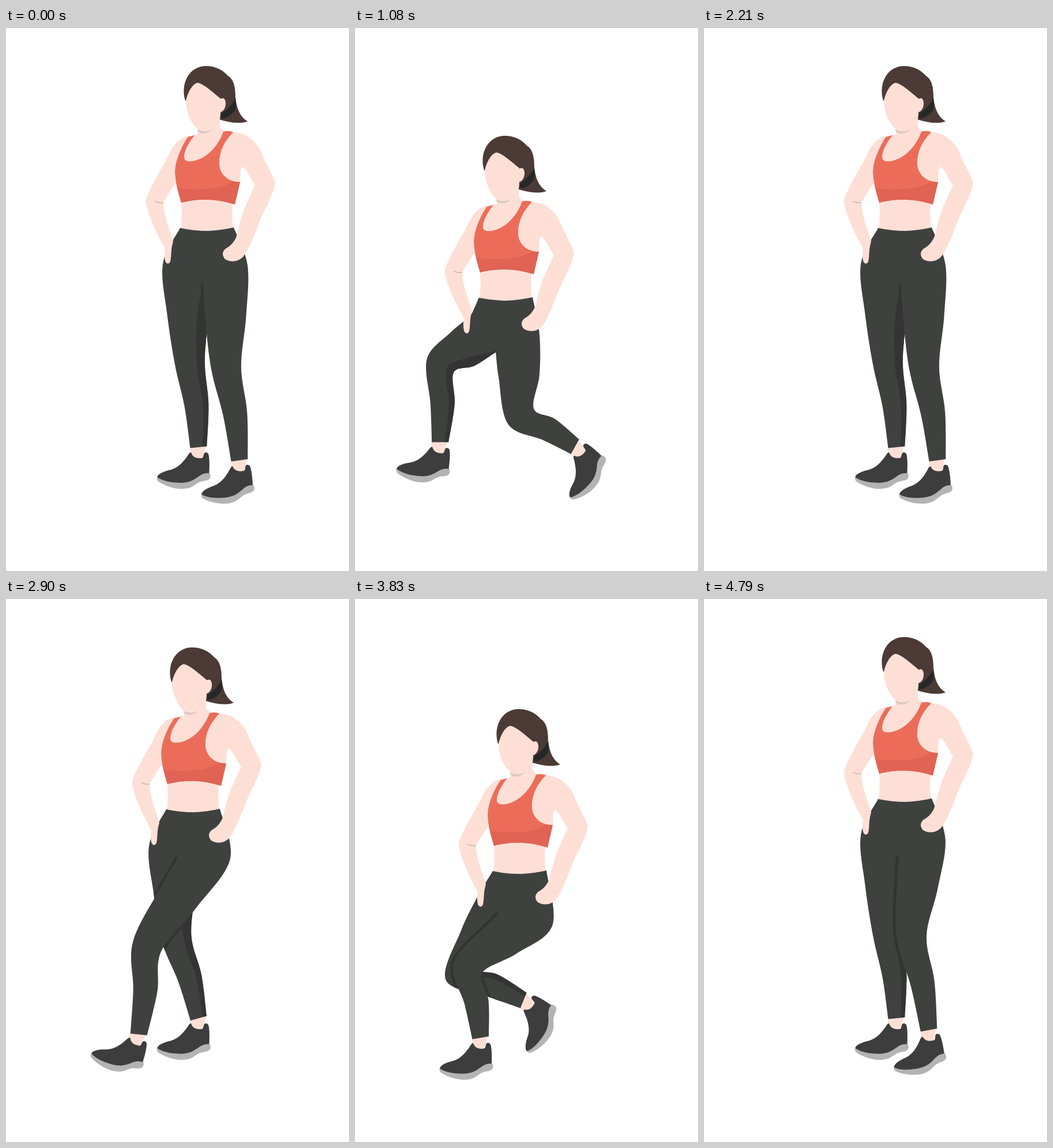
Animation of 595 by 942 pixels, one loop 4910 ms. Source, as an HTML page:

```html
<!DOCTYPE html>
<html lang="en">
<head>
<meta charset="utf-8">
<title>Alternating lunges</title>
<style>
  html, body { margin: 0; width: 100%; height: 100%; overflow: hidden; background: #fff; }
  svg { display: block; width: 100%; height: 100%; }
  .skin { fill: #fedfd6; }
  .pants { fill: #3f413f; }
  .shade { fill: #333433; }
  .hair { fill: #4b3a35; }
  .crease { fill: none; stroke: #d5bdb7; stroke-width: 2; stroke-linecap: round; }
  .cast { fill: none; stroke: #333433; stroke-width: 10; }
</style>
</head>
<body>
<svg viewBox="0 0 595 942">
  <defs>
    <clipPath id="farClip"><path id="farMask"/></clipPath>
    <g id="foot">
      <path class="skin" d="M-13-15L-12 2Q-7 10 2 10Q10 10 11 4L15-15Z"/>
      <path fill="#b3b3b3" d="M-64 49C-65 53-63 55-60 57C-46 64-25 68-10 63C0 60 4 53 10 50C17 46 27 47 28 39Q28 34 25 32Z"/>
      <path fill="#3d3d3d" d="M-64 49C-63 43-54 38-42 34C-29 29-21 17-15 6C-13 1-10-1-9 2C-6 9 3 10 10 8C13 6 11 0 14-2C17-3 20-2 21 2Q24 12 25 33C18 33 14 35 9 39C-1 48-10 55-30 55C-45 56-58 53-64 49Z"/>
    </g>
  </defs>

  <g class="body">
    <path class="skin" d="M333 165V184L315 189L304 215L310 303H304Q306 326 303 348L350 354L394 348Q391 326 393 305L405 267L396 182Q378 181 371 172V150Z"/>
    <path fill="#dcc8c2" d="M331 176Q347 183 360 173Q352 184 340 183Q333 182 331 176Z"/>
    <path class="hair" d="M311 126C302 96 318 66 347 66C363 66 377 73 385 83C395 89 398 102 398 120C400 140 406 154 419 162C405 167 388 164 371 159L370 130Z"/>
    <path fill="#252826" d="M398 122Q400 135 397 143Q388 154 377 157L372 155Q374 146 381 143Q392 134 398 122Z"/>
    <path class="skin" d="M312 126C316 109 324 97 332 95C340 95 356 109 373 123C378 119 382 126 381 133C380 141 376 145 372 146C372 158 370 164 362 172C351 182 338 181 330 173C319 163 312 142 312 126Z"/>
    <path fill="#eb6d59" d="M315 189L327 186C318 198 309 212 309 224C309 231 316 232 324 231C349 227 369 203 377 180Q386 177 395 181C378 197 370 215 370 235C371 255 386 267 406 267L397 306Q350 291 304 303Q293 270 293 248C294 229 304 204 315 189Z"/>
    <path fill="#e06354" d="M298 278C333 281 371 282 394 266L406 267L397 306Q350 291 304 303Z"/>
  </g>

  <use href="#foot" id="farFoot"/>
  <path id="farLeg" class="pants"/>
  <g clip-path="url(#farClip)">
    <path id="farShade" class="shade"/>
    <path id="castShade" class="cast"/>
  </g>
  <use href="#foot" id="nearFoot"/>
  <path id="nearLeg" class="pants"/>

  <g class="body">
    <path class="pants" d="M302 347Q326 352 350 352Q373 351 395 346L400 390L380 440L334 445L284 390Q292 368 302 347Z"/>
    <path class="skin" d="M317 187C303 190 293 199 286 213C275 237 260 258 247 287Q242 298 243 304C248 329 262 358 276 383Q274 395 276 404C278 410 283 410 285 405C287 397 286 388 288 378L290 370C284 350 273 324 273 303Q282 287 295 268Q290 245 298 224Q306 202 317 187Z"/>
    <path class="crease" d="M259 301Q266 304 272 303"/>
    <path class="skin" d="M394 181C413 181 430 192 441 211C449 234 463 254 467 269C464 290 446 319 440 336C431 358 424 379 412 396C404 406 389 407 380 401C373 393 376 385 384 381C391 377 397 369 400 361C405 339 411 318 418 303L432 273C425 264 421 251 413 243Q409 238 407 247L406 267C386 267 371 255 370 235C370 215 378 197 394 181Z"/>
  </g>
</svg>

<script>
const LOOP = 4910;
const el = id => document.getElementById(id);
const bodyParts = document.querySelectorAll('.body');

// torso: [dx, dy, near hip shift]; legs: [knee x, knee y, ankle x, ankle y, foot degrees]
const stand = { torso: [0, 0, 0], far: [319, 582, 331, 737, 6], near: [382, 590, 403, 760, 0] };
const farLift = { torso: [-38, 31, 0], far: [164, 575, 141, 705, 13.6], near: [336, 605, 403, 760, 0] };
const farReach = { torso: [-30, 23, 0], far: [162, 577, 136, 722, 11], near: [342, 603, 403, 760, 0] };
const farLunge = { torso: [-87, 121, -12], far: [148, 586, 144, 728, 10.5], near: [288, 674, 387, 735, -42.6] };
const farReturn = { torso: [-17, 3, 0], far: [185, 578, 171, 709, 12.4], near: [358, 598, 403, 760, 0] };
const nearLift = { torso: [-24, 18, 0], far: [296, 590, 331, 737, 6], near: [245, 602, 225, 764, 20] };
const nearReach = { torso: [-38, 23, 0], far: [296, 590, 331, 737, 6], near: [238, 606, 212, 771, 5] };
const nearLunge = { torso: [-63, 125, 0], far: [182, 652, 299, 704, -52], near: [196, 640, 215, 771, 5] };
const nearDeep = { ...nearLunge, torso: [-66, 131, 0] };
const settle = { ...stand, near: [360, 586, 389, 758, -5] };

// Each phase moves on from the pose before it: [start ms, ms per step, steps, pose]
const phases = [
  [0, 80, 1, stand],
  [200, 80, 5, farReach],
  [720, 120, 4, farLunge],
  [1410, 120, 3, farLift],
  [1770, 120, 2, farReturn],
  [1970, 80, 4, stand],
  [2540, 120, 4, nearLift],
  [3020, 120, 1, nearReach],
  [3140, 120, 4, nearDeep],
  [3830, 120, 1, nearLunge],
  [3950, 120, 4, nearLift],
  [4430, 120, 4, settle]
];

const ease = p => p * p * (3 - 2 * p);
const lerp = (a, b, t) => a.map((v, i) => v + (b[i] - v) * t);

function poseAt(time) {
  const index = phases.findLastIndex(([start]) => start <= time);
  const [start, interval, count, to] = phases[index];
  const from = index ? phases[index - 1][3] : to;
  const step = Math.min(count, Math.floor((time - start) / interval) + 1);
  const mix = ease(step / count);
  return {
    torso: lerp(from.torso, to.torso, mix),
    far: lerp(from.far, to.far, mix),
    near: lerp(from.near, to.near, mix)
  };
}

function unit([x, y]) {
  const length = Math.hypot(x, y);
  return [x / length, y / length];
}

// Smooth open curve through the points, starting with the given command.
function curve(pts, command = 'L') {
  const at = i => pts[Math.max(0, Math.min(pts.length - 1, i))];
  const handle = (p, a, b) => [0, 1].map(k => p[k] + (b[k] - a[k]) / 6);
  let d = command + pts[0];
  for (let i = 0; i < pts.length - 1; i++) {
    d += `C${handle(at(i), at(i - 1), at(i + 1))} ${handle(at(i + 1), at(i + 2), at(i))} ${at(i + 1)}`;
  }
  return d;
}

// Tapers a trouser leg around the hip-knee-hem axis.
function legEdges(hip, [kneeX, kneeY, ankleX, ankleY, degrees]) {
  const angle = degrees * Math.PI / 180;
  const knee = [kneeX, kneeY];
  const hem = [
    ankleX + 2 * Math.cos(angle) + 10 * Math.sin(angle),
    ankleY + 2 * Math.sin(angle) - 10 * Math.cos(angle)
  ];
  const thigh = unit([knee[0] - hip[0], knee[1] - hip[1]]);
  const shin = unit([hem[0] - knee[0], hem[1] - knee[1]]);
  const bend = unit([thigh[0] + shin[0], thigh[1] + shin[1]]);
  // centre, direction, half width, shade width, backward bulge
  const sections = [
    [hip, thigh, 39, 0, 0],
    [lerp(hip, knee, .5), thigh, 35.5, 18, 0],
    [knee, bend, 26, 14, 0],
    [lerp(knee, hem, .5), shin, 21, 10, 4],
    [hem, shin, 14.5, 7, 0]
  ];
  const edge = offset => sections.map(([[x, y], [dx, dy], width, shade, bulge]) => {
    const out = offset(width, shade) + bulge;
    return [x + dy * out, y - dx * out];
  });
  return {
    front: edge(width => -width),
    back: edge(width => width),
    inner: edge((width, shade) => width - shade)
  };
}

function placeFoot(id, [, , x, y, angle]) {
  el(id).setAttribute('transform', `translate(${x} ${y}) rotate(${angle})`);
}

function draw({ torso: [tx, ty, shift], far, near }) {
  const farEdges = legEdges([311 + tx, 408 + ty], far);
  const nearEdges = legEdges([380 + tx + shift, 412 + ty], near);
  const farBack = farEdges.back.toReversed();
  const farPath = curve([[302 + tx, 347 + ty], ...farEdges.front], 'M') + curve(farBack) + 'Z';
  const nearPath = curve([[395 + tx, 346 + ty], ...nearEdges.back], 'M')
    + curve(nearEdges.front.toReversed()) + 'Z';

  el('farLeg').setAttribute('d', farPath);
  el('farMask').setAttribute('d', farPath);
  el('farShade').setAttribute('d', curve(farEdges.inner, 'M') + curve(farBack) + 'Z');
  el('nearLeg').setAttribute('d', nearPath);
  el('castShade').setAttribute('d', nearPath);
  placeFoot('farFoot', far);
  placeFoot('nearFoot', near);
  bodyParts.forEach(g => g.setAttribute('transform', `translate(${tx} ${ty})`));
}

const start = performance.now();

function tick() {
  draw(poseAt((performance.now() - start) % LOOP));
  requestAnimationFrame(tick);
}
tick();
</script>
</body>
</html>
```
